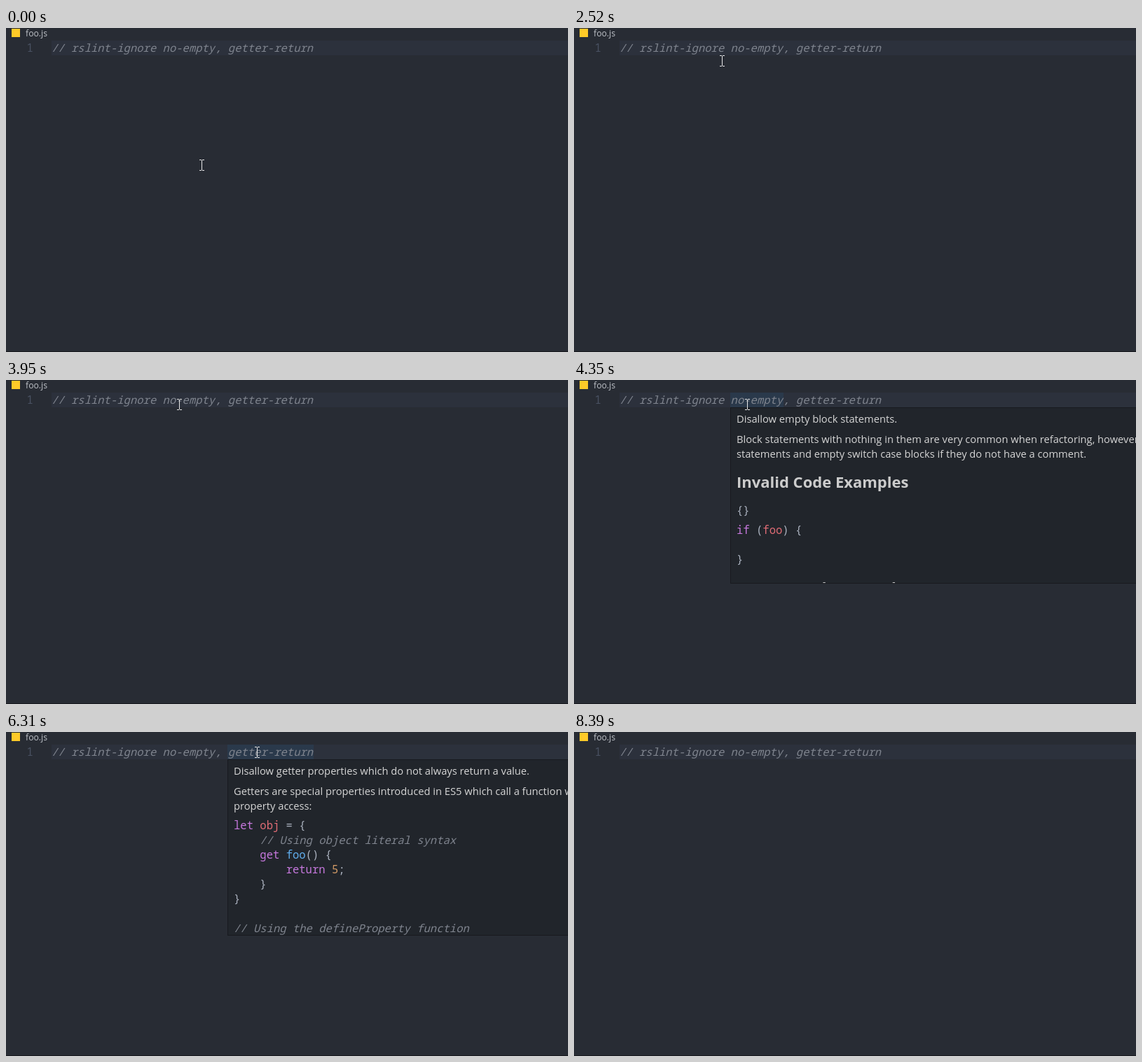
An HTML page for the animation above (8700 ms loop, 802 by 463 pixels).

```html
<!DOCTYPE html>
<html lang="en">
<head>
<meta charset="utf-8">
<title>foo.js</title>
<style>
  html, body { margin: 0; width: 100%; height: 100%; overflow: hidden; background: #282c34; }
  svg { display: block; }
  text { white-space: pre; }
  .code { font: 15.55px "Noto Sans Mono", monospace; fill: #abb2bf; }
  .ui { font: 14.7px "Open Sans", sans-serif; fill: #d6d6d6; }
  .head { font: 700 22px "Open Sans", sans-serif; fill: #ccc; }
  .tab { font: 12.2px "Open Sans", sans-serif; fill: #bfc2c8; }
  .chip { font-size: 14px; fill: #d6d6d6; }
  .num { fill: #495162; }
  .com { fill: #7f848e; font-style: italic; }
  .key { fill: #c678dd; }
  .var { fill: #e06c75; }
  .fn { fill: #61afef; }
  .lit { fill: #d19a66; }
</style>
</head>
<body>
<svg id="stage" width="100%" height="100%" viewBox="0 0 802 463"></svg>
<script>
const LOOP = 8700;
const stage = document.getElementById('stage');

const text = (x, y, cls, body) => `<text x="${x}" y="${y}" class="${cls}">${body}</text>`;
const span = (cls, body) => `<tspan class="${cls}">${body}</tspan>`;
const rect = (x, y, w, h, fill, more = '') =>
  `<rect x="${x}" y="${y}" width="${w}" height="${h}" fill="${fill}" ${more}/>`;
const rows = (x, y, step, cls, lines) =>
  lines.map((line, i) => text(x, y + i * step, cls, line)).join('');

// Word highlight; sits below the editor text
const mark = (id, x, w) => rect(x, 18, w, 21, '#264f78', `id="${id}-mark" fill-opacity=".25"`);

// Bordered hover box whose content is clipped to its inside
const popup = (id, x, y, w, h, body) => `<g id="${id}">
  ${rect(x + .5, y + .5, w - 1, h - 1, '#21252b', 'stroke="#181a1f"')}
  <svg x="${x + 1}" y="${y + 1}" width="${w - 2}" height="${h - 2}"
    viewBox="${x + 1} ${y + 1} ${w - 2} ${h - 2}">${body}</svg></g>`;

const ignoreTip =
  rect(167, -8, 64, 21, '#1a1d22', 'rx="3"') +
  text(173.5, 9, 'code chip', 'ignore') +
  text(235, 9, 'ui', 'will ignore all rules, or any given rules in some range or node.');

const emptyTip =
  text(232, 61, 'ui', 'Disallow empty block statements.') +
  rows(232, 90, 21, 'ui', [
    'Block statements with nothing in them are very common when refactoring, however',
    'statements and empty switch case blocks if they do not have a comment.'
  ]) +
  text(232, 154, 'head', 'Invalid Code Examples') +
  text(232, 191.5, 'code', '{}') +
  rows(232, 220, 21, 'code', [`${span('key', 'if')} (${span('var', 'foo')}) {`, '', '}']) +
  text(232, 305, 'head', 'Correct Code Examples');

const getterTip =
  text(325, 61, 'ui', 'Disallow getter properties which do not always return a value.') +
  rows(325, 90, 21, 'ui', [
    'Getters are special properties introduced in ES5 which call a function whenever',
    'property access:'
  ]) +
  rows(325, 139, 21, 'code', [
    `${span('key', 'let')} ${span('var', 'obj')} = {`,
    span('com', '    // Using object literal syntax'),
    `    ${span('key', 'get')} ${span('fn', 'foo')}() {`,
    `        ${span('key', 'return')} ${span('lit', '5')};`,
    '    }',
    '}',
    '',
    span('com', '// Using the defineProperty function')
  ]);

stage.innerHTML =
  rect(0, 0, 802, 463, '#282c34') +
  rect(65, 18, 737, 21, '#2c313c') +
  rect(0, 462, 802, 1, '#181a1f') +
  rect(8, 1, 12, 12, '#ffca28') +
  text(28, 12, 'tab', 'foo.js') +
  mark('ignore', 158, 57) + mark('empty', 223, 76) + mark('getter', 316, 123) +
  text(29.5, 34, 'code num', '1') +
  text(65, 34, 'code com', '// rslint-ignore no-empty, getter-return') +
  popup('ignore', 158, -20, 505, 40, ignoreTip) +
  popup('empty', 223, 39, 600, 252, emptyTip) +
  popup('getter', 316, 39, 507, 252, getterTip) +
  `<path id="beam" fill="#e8e8e8" shape-rendering="crispEdges"
    d="M0 0h3v1h-3zM4 0h3v1h-3zM3 1h1v14h-1zM0 15h3v1h-3zM4 15h3v1h-3z"/>
  <path id="arrow" fill="#fff" stroke="#000" stroke-width="1"
    d="M.5.7V16.3L4.1 12.9 6.6 18.5 9 17.4 6.5 11.9H11.5Z"/>`;

// [start, x, y, shape]; the pointer jumps and holds
const pointer = [
  [0, 276, 188, 'beam'], [460, 275, 186, 'beam'], [600, 216, 79, 'beam'],
  [750, 146, 36, 'beam'], [870, 122, 18, 'beam'], [1170, 227, 33, 'beam'],
  [1320, 207, 30, 'beam'], [1440, 201, 28, 'beam'], [2400, 205, 35, 'beam'],
  [2520, 208, 39, 'beam'], [2830, 203, 27, 'beam'], [3710, 215, 27, 'beam'],
  [3830, 235, 27, 'beam'], [3950, 244, 27, 'beam'], [5730, 296, 26, 'beam'],
  [5880, 356, 21, 'beam'], [6160, 355, 21, 'beam'], [6740, 350, 21, 'beam'],
  [7600, 354, 25, 'beam'], [7860, 527, 169, 'arrow'], [8000, 640, 272, 'arrow'],
  [8120, 731, 378, 'beam'], [8260, 766, 437, 'beam'], [8390, 0, 0, '']
];

// [start, open popup, opacity]
const hover = [
  [0, '', 0], [1720, 'ignore', .62], [1870, 'ignore', 1], [2400, '', 0],
  [3260, 'ignore', 1], [3710, '', 0], [4350, 'empty', 1], [5880, '', 0],
  [6310, 'getter', 1], [8120, '', 0]
];

const at = (track, t) => track.filter(step => step[0] <= t).pop();
const show = (id, on) => {
  const el = document.getElementById(id);
  el.style.display = on ? '' : 'none';
  return el;
};

function draw(t) {
  const [, x, y, shape] = at(pointer, t);
  for (const id of ['beam', 'arrow'])
    show(id, id === shape).setAttribute('transform', `translate(${x} ${y})`);

  const [, open, alpha] = at(hover, t);
  for (const id of ['ignore', 'empty', 'getter']) {
    show(id, id === open).setAttribute('opacity', alpha);
    show(id + '-mark', id === open);
  }
}

const start = performance.now();
function tick() {
  draw((performance.now() - start) % LOOP);
  requestAnimationFrame(tick);
}
tick();
</script>
</body>
</html>
```
